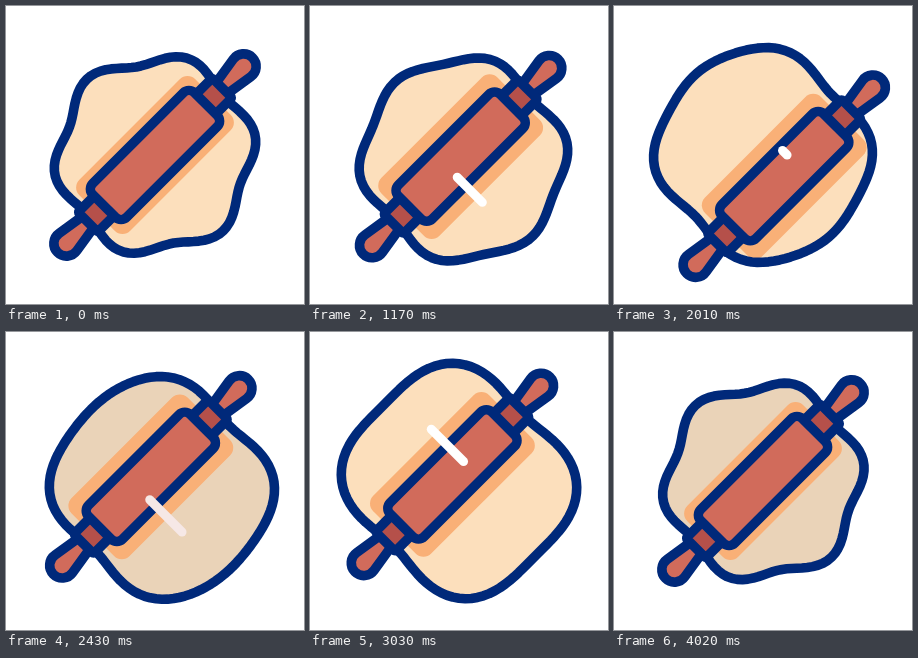
An HTML page that plays this animation: 298x298 px, repeating every 4.2 s.

```html
<!DOCTYPE html>
<html lang="en">
<head>
<meta charset="utf-8">
<title>Rolling pin</title>
<style>
  html, body { margin: 0; width: 100%; height: 100%; overflow: hidden; background: #fff; }
  svg { display: block; width: 100vw; height: 100vh; }
  .ink { stroke: #00297a; stroke-width: 9.6; stroke-linejoin: round; }
  .wood { fill: #d16b5b; }
  .collar { fill: #b5504a; }
  .rim { fill: none; }
  #shade { fill: #f9b077; }
  #lines { fill: none; stroke-width: 9; stroke-linecap: round; }
</style>
</head>
<body>
<svg viewBox="0 0 298 298">
  <defs>
    <path id="dough"/>
    <clipPath id="inside"><use href="#dough"/></clipPath>
    <g id="end" class="ink">
      <path class="wood" d="M92-7.5L123-12.4A12.6 12.6 0 1 1 123 12.4L92 7.5Z"/>
      <rect class="collar" x="68" y="-14" width="27" height="28" rx="2"/>
    </g>
  </defs>
  <g transform="translate(149 149) rotate(-45)">
    <use id="fill" href="#dough"/>
    <g clip-path="url(#inside)"><rect id="shade" x="-82" width="164" rx="11"/></g>
    <use class="ink rim" href="#dough"/>
    <g id="pin">
      <use href="#end"/>
      <use href="#end" transform="rotate(180)"/>
      <rect class="ink wood" x="-72" y="-24" width="144" height="48" rx="8"/>
    </g>
    <g id="lines"><path id="long"/><path id="short"/></g>
  </g>
</svg>
<script>
const LOOP = 4200, START = 300, SWEEP = 600;
const TURNS = [0, 21, -23, 33, -34, 8.5, 0]; // where the pin turns back, across its axis
const $ = id => document.getElementById(id);
const clamp = x => Math.max(0, Math.min(1, x));
const mix = (a, b, k) => a + (b - a) * k;
const ease = x => (1 - Math.cos(Math.PI * clamp(x))) / 2;
const span = (t, a, b) => clamp((t - a) / (b - a));

// Current sweep: its number, time since it began, both ends and the pin's place
function sweepAt(t) {
  const s = Math.max(0, (t - START) / SWEEP);
  const i = Math.min(Math.floor(s), TURNS.length - 2);
  const [from, to] = TURNS.slice(i, i + 2);
  return { i, from, to, age: (s - i) * SWEEP, y: mix(from, to, ease(s - i)) };
}

// Six-lobed ball (k = 0) rolled out to a rounded square (k = 1)
function outline(k, cy) {
  const steps = 120, pts = [];
  for (let i = 0; i < steps; i++) {
    const a = i / steps * 2 * Math.PI;
    const ball = 96 + 6 * Math.cos(6 * a - 0.42);
    const flat = 108.4 + 7.5 * Math.cos(2 * a) - 8.9 * Math.cos(4 * a);
    const r = mix(ball, flat, k);
    pts.push(`${(r * Math.sin(a)).toFixed(2)} ${(cy - r * Math.cos(a)).toFixed(2)}`);
  }
  return `M${pts.join("L")}Z`;
}

// A speed line drawn on by its head and wiped off by its tail
function speedLine(id, x, y, dir, from, to, head, tail) {
  const at = k => y + dir * mix(from, to, ease(k));
  const on = head > 0 && tail < 1;
  $(id).setAttribute("d", on ? `M${x} ${at(tail)}L${x} ${at(head) + 0.01}` : "");
}

function draw(t) {
  const pin = sweepAt(t);
  $("pin").setAttribute("transform", `translate(0 ${pin.y})`);

  // The dough spreads with every sweep, lags behind the pin, then springs back
  const rolled = Math.pow(span(t, 330, 3030), 1.15) * (1 - ease(span(t, 3030, 3730)));
  const push = 0.3 * Math.max(0, sweepAt(t - 300).y);
  $("dough").setAttribute("d", outline(rolled, push));

  const half = 36 + 5 * ease(span(t, 330, 900)) * (1 - ease(span(t, 3500, 3900)));
  $("shade").setAttribute("y", pin.y - half);
  $("shade").setAttribute("height", 2 * half);

  const dir = pin.i > 0 && pin.i < 5 ? Math.sign(pin.to - pin.from) : 0;
  const age = dir ? pin.age : 0;
  speedLine("long", 17 * dir, pin.from, dir, -29, 40, span(age, 85, 450), span(age, 270, 570));
  speedLine("short", -17 * dir, pin.from, dir, -40, -5, span(age, 40, 200), span(age, 100, 250));

  const dull = (t >= 2130 && t < 2730) || t >= 3270;
  $("fill").setAttribute("fill", dull ? "#ead3b8" : "#fcdfbc");
  $("lines").setAttribute("stroke", dull ? "#f6e8e6" : "#fff");
}

const t0 = performance.now();
function tick() {
  draw((performance.now() - t0) % LOOP);
  requestAnimationFrame(tick);
}
tick();
</script>
</body>
</html>
```
